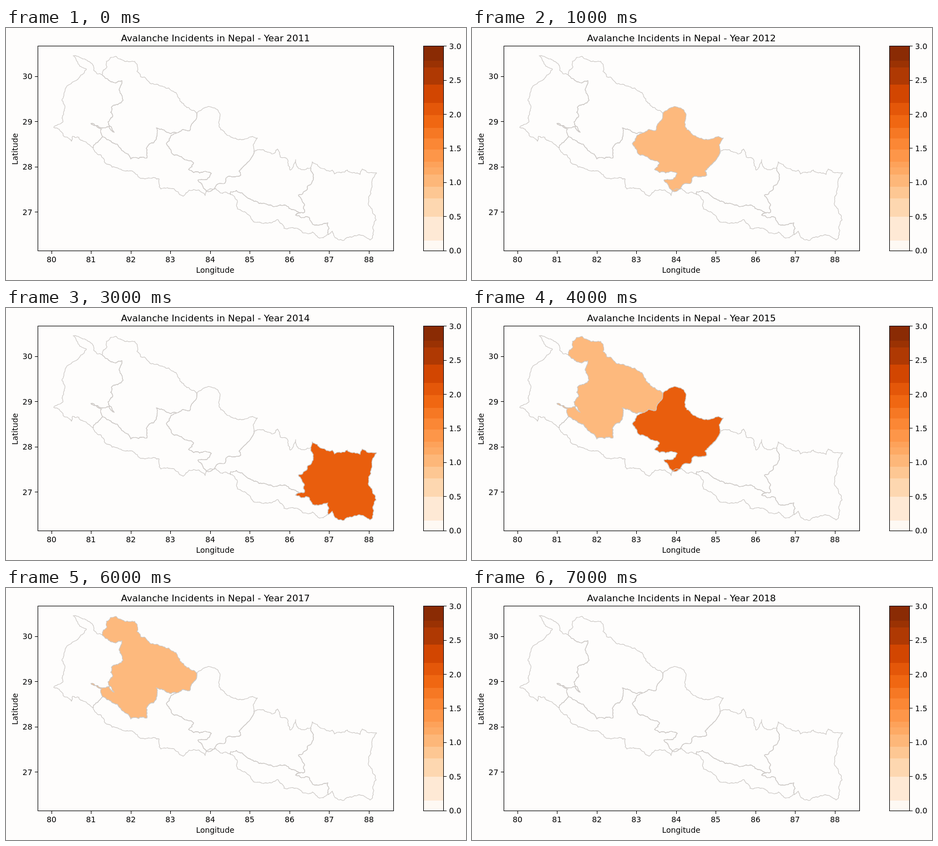
Recreate the animation shown at these times as an HTML page. Size 829x454 px, loop 8000 ms.

```html
<!DOCTYPE html>
<html lang="en">
<head>
<meta charset="utf-8">
<title>Avalanche map</title>
<style>
  html, body { margin: 0; width: 100%; height: 100%; overflow: hidden; background: #fefdfc; }
  svg { display: block; }
  text { font: 13.89px "DejaVu Sans", sans-serif; }
  #title { font-size: 16.67px; }
  #map { stroke: #ccc8c5; stroke-width: 1.15; stroke-linejoin: round; }
  .frame { fill: none; stroke: #000; shape-rendering: crispEdges; }
</style>
</head>
<body>
<svg width="829" height="454" viewBox="0 0 829 454">
  <g id="map"></g>
  <g id="bar" shape-rendering="crispEdges"></g>
  <g id="axes">
    <rect class="frame" x="57.5" y="32.5" width="641" height="369"/>
    <rect class="frame" x="752.5" y="32.5" width="36" height="369"/>
  </g>
  <text id="title" x="377.5" y="24" text-anchor="middle"></text>
  <text x="377" y="441" text-anchor="middle">Longitude</text>
  <text transform="translate(21 218) rotate(-90)" text-anchor="middle">Latitude</text>
</svg>
<script>
const $ = id => document.getElementById(id);

function add(parent, tag, attrs, text = '') {
  const node = document.createElementNS('http://www.w3.org/2000/svg', tag);
  for (const key in attrs) node.setAttribute(key, attrs[key]);
  node.textContent = text;
  return parent.appendChild(node);
}

// Corner points of the borders; each border is shared by its neighbours.
const borders = {
  farWest: '173,84 158,76 157,67 135,54 121,50 145,74 134,86 108,108 101,131 104,155 102,170 86,179 100,187 118,204 120,195 140,204 157,216',
  farWestKarnali: '173,84 187,95 209,95 204,112 211,130 190,143 192,160 184,169 195,188 186,177 153,172 172,182 174,196',
  farWestLumbini: '174,196 157,216',
  karnaliNorth: '173,84 182,70 181,60 198,51 232,60 236,78 274,102 309,121 330,144 344,155',
  karnaliLumbini: '174,196 207,217 225,236 254,234 256,212 266,207 271,180 307,189',
  karnaliGandaki: '307,189 331,185 344,155',
  gandakiNorth: '344,155 368,142 383,151 384,177 430,200 441,196 453,198 447,222',
  gandakiBagmati: '447,222 438,240 420,258 423,265 402,267 378,285 361,294',
  gandakiLumbini: '307,189 289,208 318,234 338,243 329,255 370,262 362,273 346,274 361,294',
  lumbiniSouth: '157,216 176,235 212,257 242,271 276,272 279,290 310,295 319,303 330,292 359,302 361,294',
  bagmatiSouth: '361,294 378,289 405,300',
  bagmatiMadhesh: '405,300 405,295 425,297 434,305 471,318 505,320 531,333 522,337',
  bagmatiNorth: '447,222 479,227 489,218 494,232 508,238 512,256 522,237 527,253 549,252',
  bagmatiKoshi: '549,252 551,279 527,301 538,318 538,332 522,337',
  koshiEast: '549,252 552,241 588,256 592,263 638,264 642,254 668,261 658,290 654,320 667,346 662,372 656,382 625,376 607,383 592,376 588,366 581,372',
  madheshKoshi: '522,337 546,341 553,354 580,351 581,372',
  madheshSouth: '405,300 417,312 417,326 455,350 490,345 501,361 530,364 572,378 581,372'
};

// A leading minus walks the border backwards.
const provinces = {
  farWest: 'farWest -farWestLumbini -farWestKarnali',
  karnali: 'karnaliNorth -karnaliGandaki -karnaliLumbini -farWestKarnali',
  lumbini: 'karnaliLumbini gandakiLumbini -lumbiniSouth -farWestLumbini',
  gandaki: 'gandakiNorth gandakiBagmati -gandakiLumbini karnaliGandaki',
  bagmati: 'bagmatiNorth bagmatiKoshi -bagmatiMadhesh -bagmatiSouth -gandakiBagmati',
  madhesh: 'bagmatiMadhesh madheshKoshi -madheshSouth',
  koshi: 'koshiEast -madheshKoshi -bagmatiKoshi'
};

const firstYear = 2011;
const incidents = [
  {},
  { gandaki: 1 },
  { farWest: 3, karnali: 1, gandaki: 1, koshi: 1 },
  { koshi: 2 },
  { karnali: 1, gandaki: 2 },
  {},
  { karnali: 1 },
  {}
];

const palette = ['#fefefe', '#fee6ce', '#fdd0a2', '#fdae6b', '#fd8d3c', '#f16913', '#d94801', '#a63603', '#7f2704'];

// Colour for a value from 0 to 3.
function shade(value) {
  const pos = value / 3 * (palette.length - 1);
  const i = Math.min(Math.floor(pos), palette.length - 2);
  return `color-mix(in srgb, ${palette[i + 1]} ${(pos - i) * 100}%, ${palette[i]})`;
}

let seed = 7;
const random = () => (seed = seed * 16807 % 2147483647) / 2147483647;

// Points after a, up to and including b, along a ragged line (midpoint displacement).
function ragged(a, b) {
  const dx = b[0] - a[0], dy = b[1] - a[1];
  if (Math.hypot(dx, dy) < 3) return [b];
  const shift = (random() - 0.5) * 0.36;
  const mid = [(a[0] + b[0]) / 2 - dy * shift, (a[1] + b[1]) / 2 + dx * shift];
  return [...ragged(a, mid), ...ragged(mid, b)];
}

const lines = {};
for (const name in borders) {
  const points = borders[name].split(' ').map(pair => pair.split(',').map(Number));
  lines[name] = points.flatMap((p, i) => i ? ragged(points[i - 1], p) : [p]);
}

const shapes = {};
for (const name in provinces) {
  const ring = provinces[name].split(' ').flatMap(part =>
    part[0] === '-' ? [...lines[part.slice(1)]].reverse() : lines[part]);
  shapes[name] = add($('map'), 'path', {
    d: 'M' + ring.map(([x, y]) => x.toFixed(1) + ' ' + y.toFixed(1)).join('L') + 'Z'
  });
}

// The colour bar is a scale posterised into uneven bands.
const barTop = 32.6, unit = 122.9;
const bandEdges = [33, 59, 71, 102, 135, 157, 180, 199, 219, 241, 251, 264, 286, 307, 340, 383, 401];
bandEdges.slice(1).forEach((bottom, i) => {
  const y = bandEdges[i];
  const value = 3 - ((y + bottom) / 2 - barTop) / unit;
  add($('bar'), 'rect', { x: 753, y, width: 35, height: bottom - y, style: `fill: ${shade(value)}` });
});

const axes = $('axes');
const tick = d => add(axes, 'path', { class: 'frame', d });
const label = (x, y, anchor, text) => add(axes, 'text', { x, y, 'text-anchor': anchor }, text);
const snap = v => Math.floor(v) + 0.5;
for (let i = 0; i < 9; i++) {
  const x = 82 + 71.5 * i;
  tick(`M${snap(x)} 402v5`);
  label(Math.floor(x), 422, 'middle', 80 + i);
}
for (let i = 0; i < 4; i++) {
  const y = 87.3 + 81.4 * i;
  tick(`M57 ${snap(y)}h-5`);
  label(47.5, Math.round(y + 5), 'end', 30 - i);
}
for (let i = 0; i < 7; i++) {
  const y = barTop + unit * i / 2;
  tick(`M789 ${snap(y)}h5`);
  label(798.5, Math.round(y + 5), 'start', (3 - i / 2).toFixed(1));
}

let shown = -1;
function draw() {
  const index = Math.floor(performance.now() / 1000) % incidents.length;
  if (index !== shown) {
    shown = index;
    $('title').textContent = `Avalanche Incidents in Nepal - Year ${firstYear + index}`;
    for (const name in shapes) {
      const count = incidents[index][name];
      shapes[name].style.fill = count ? shade(count) : 'none';
    }
  }
  requestAnimationFrame(draw);
}
draw();
</script>
</body>
</html>
```
